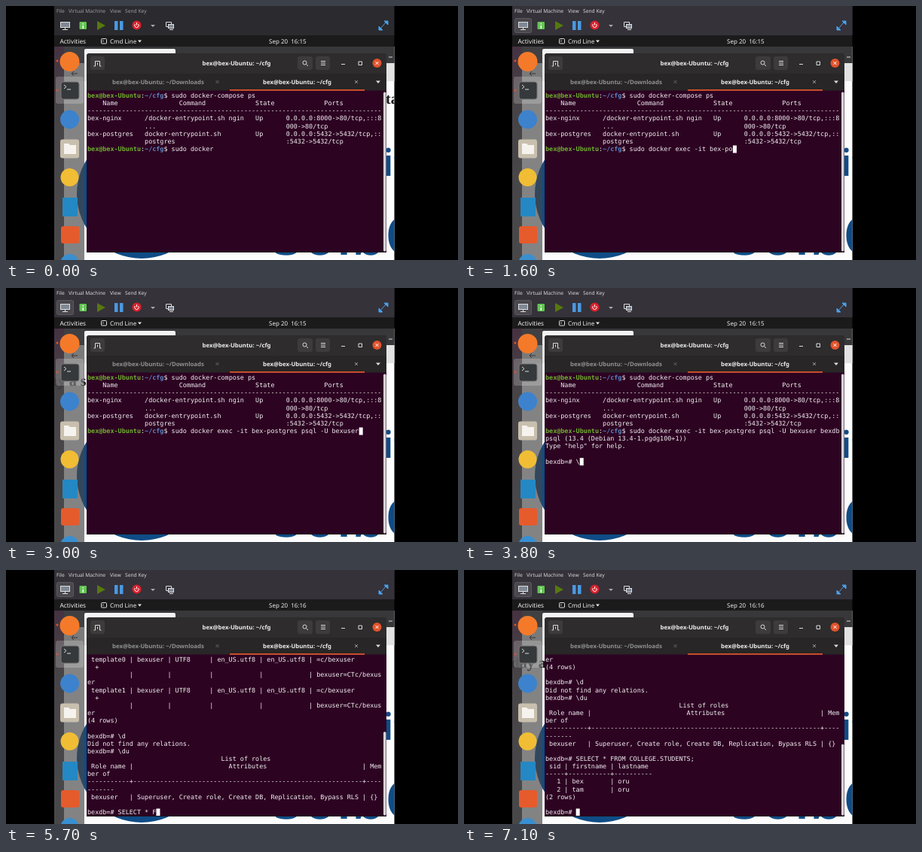
Write an HTML page that moves like this. It is 600 px wide and 338 px high and loops after 7.2 s.

```html
<!DOCTYPE html>
<html lang="en">
<head>
<meta charset="utf-8">
<style>
  html, body { margin: 0; width: 100%; height: 100%; overflow: hidden; background: #000; }
  svg { display: block; width: 100vw; height: 100vh; }
  text { white-space: pre; text-rendering: geometricPrecision; }
  .ui { font: 8px "Noto Sans", sans-serif; fill: #eee; }
  .menu { font-size: 6.7px; fill: #d8d8d8; }
  .bold { font-weight: 700; font-size: 7.8px; }
  .mid { text-anchor: middle; }
  .mono { font: 8.438px "DejaVu Sans Mono", monospace; fill: #f2f0f2; }
  .user { font-weight: 700; fill: #6fb02e; }
  .path { font-weight: 700; fill: #5b87c4; }
  .serif { font: 700 20px "Liberation Serif", serif; fill: #161616; }
  .brand { font-family: "Open Sans", sans-serif; font-weight: 600; fill: #0f4c86; text-anchor: end; }
  .line { fill: none; stroke: #ddd; }
</style>
</head>
<body>
<svg viewBox="0 0 600 338" preserveAspectRatio="none">
  <defs>
    <clipPath id="desk"><rect x="64" width="451.5" height="338"/></clipPath>
    <linearGradient id="wall" x2="0" y2="1">
      <stop stop-color="#4a0f3a"/>
      <stop offset=".3" stop-color="#4c4449"/>
      <stop offset="1" stop-color="#505052"/>
    </linearGradient>
  </defs>
  <rect width="600" height="338" fill="#000"/>
  <g clip-path="url(#desk)">
    <!-- web page -->
    <rect x="64" y="54" width="452" height="284" fill="#fcfcfc"/>
    <rect x="64" y="54" width="452" height="22" fill="#38383a"/>
    <rect x="104" y="57" width="121" height="20" rx="2" fill="#f3f3f3"/>
    <rect x="64" y="76" width="452" height="24" fill="#e2e2e3"/>
    <path d="M508 68h5" stroke="#ddd"/>
    <circle cx="180" cy="250" r="86" fill="#0f4c86"/>
    <text class="brand" x="534" y="226" font-size="50">Mirelit</text>
    <text class="brand" x="560" y="331" font-size="72">SolbO</text>
    <rect x="64" y="54" width="13" height="284" fill="url(#wall)"/>
    <text class="serif" id="ticker" y="130"><tspan id="lead">We </tspan>taste a proud Friday a school</text>

    <!-- dock -->
    <rect x="64" y="54" width="40" height="284" fill="#454547" fill-opacity=".66"/>
    <path d="M95 90h-8m3-3l-3 3 3 3" class="line" style="stroke:#333"/>
    <rect x="66" y="94" width="37" height="36" rx="3" fill="#fff" fill-opacity=".2"/>
    <circle cx="68" cy="73" r="1.5" fill="#e0522b"/>
    <circle cx="68" cy="112" r="1.5" fill="#e0522b"/>
    <circle cx="84.500" cy="74" r="13" fill="#f47a2a"/>
    <rect x="73" y="101" width="24" height="23" rx="3" fill="#36393b" stroke="#777"/>
    <path d="M77 105l3 2.500-3 2.500m4 1h5" class="line"/>
    <circle cx="84.500" cy="151" r="12.500" fill="#3d82cc"/>
    <rect x="72" y="177.500" width="25" height="25" rx="3" fill="#c9bfae"/>
    <path d="M77 183h6l2 2h8v12h-16z" fill="#f6f3ee"/>
    <circle cx="84.500" cy="228" r="12" fill="#f0bd35"/>
    <rect x="75" y="255" width="20" height="25" fill="#2488c4"/>
    <rect x="73" y="293" width="24" height="23" rx="3" fill="#e55b2c"/>
    <circle cx="84.500" cy="342" r="12" fill="#3a8fd0"/>

    <!-- viewer menu and toolbar -->
    <rect x="64" width="452" height="39" fill="#2b2a2e"/>
    <rect id="glow" x="64" width="452" height="39" fill="#35323a"/>
    <g class="ui" id="menu">
      <text class="menu" x="67" y="9">File</text>
      <text class="menu" x="83" y="9">Virtual Machine</text>
      <text class="menu" x="138" y="9">View</text>
      <text class="menu" x="158" y="9">Send Key</text>
    </g>
    <rect id="focus" x="67.500" y="16.500" width="22" height="19" rx="2" fill="#4a484d" stroke="#5c5a60"/>
    <rect x="72.500" y="21.500" width="12" height="7" fill="#7f8894" stroke="#ddd"/>
    <path d="M75 31.500h7m-3.500-3v3" class="line"/>
    <rect x="97.500" y="21" width="9.500" height="10" rx="1" fill="#62c552"/>
    <path d="M102.300 23v1.500m0 1.500v4" stroke="#fff" stroke-width="1.500"/>
    <path d="M121 20l11 6-11 6z" fill="#57780f"/>
    <path d="M144 20h4.500v12h-4.500zm7 0h4.500v12h-4.500z" fill="#4a98e0"/>
    <circle cx="173.500" cy="25.500" r="6" fill="#dd202c"/>
    <path d="M171.500 24a2.700 2.700 0 1 0 4 0m-2-2v3.500" class="line" style="stroke:#fff"/>
    <path d="M192 25h6l-3 3z" fill="#aaa"/>
    <path d="M212.500 21.500h7v6h-7z" class="line"/>
    <rect x="215.500" y="24.500" width="7" height="5" fill="#7f8894" stroke="#ddd"/>
    <path d="M217 31.500h5" class="line"/>
    <path d="M502 20h5v5zM495 27v5h5zM497 30l7-8" fill="#4aa0e8" stroke="#4aa0e8"/>

    <!-- desktop bar -->
    <rect x="64" y="39" width="452" height="15" fill="#1b1b1c"/>
    <g class="ui">
      <text x="71.500" y="49.500" font-size="8.300">Activities</text>
      <rect x="126.500" y="43.500" width="7" height="6.500" rx="1" class="line"/>
      <path d="M128 45l1.500 1.500-1.500 1.500" class="line" stroke-width=".8"/>
      <text x="138" y="49.500">Cmd Line</text>
      <path d="M175 45.500h5l-2.500 3z"/>
      <text x="349" y="49.500" id="clock"></text>
    </g>

    <!-- shell window -->
    <path d="M107 328v-261q0-4 4-4h390q4 0 4 4v261z" fill="#2d0322"/>
    <path d="M107 112.500v-45.500q0-4 4-4h390q4 0 4 4v45.500z" fill="#282627"/>
    <path d="M107 90v-23q0-4 4-4h390q4 0 4 4v23z" fill="#2e2c2d"/>
    <g fill="#3d3b3c">
      <rect x="112" y="67" width="19" height="18" rx="3"/>
      <rect x="387" y="67" width="20" height="18" rx="3"/>
      <rect x="411" y="67" width="19" height="18" rx="3"/>
    </g>
    <path d="M118.500 80v-6.500h6v6.500m-8 0h2m6 0h2m-5-4.500v3" class="line"/>
    <circle cx="396.500" cy="75.500" r="2.500" class="line"/>
    <path d="M398.500 77.500l2.500 2.500M418 73.500h6m-6 2.500h6m-6 2.500h6M445 77.500h5M468 74h4.500v4.500h-4.500z" class="line"/>
    <circle cx="492.500" cy="76" r="6" fill="#e2532c"/>
    <path d="M490.500 74l4 4m0-4l-4 4" class="line" style="stroke:#fff"/>
    <g class="ui bold mid">
      <text x="306" y="79">bex@bex-Ubuntu: ~/cfg</text>
      <text x="202" y="104" fill="#929292">bex@bex-Ubuntu: ~/Downloads</text>
      <text x="386.500" y="104">bex@bex-Ubuntu: ~/cfg</text>
    </g>
    <path d="M278.500 99l4 4m0-4l-4 4" class="line" style="stroke:#666"/>
    <path d="M463 99l4 4m0-4l-4 4" class="line" style="stroke:#999"/>
    <path d="M491 99.500h6l-3 3.500z" fill="#ddd"/>
    <rect x="297" y="111" width="179" height="1.800" fill="#d9532c"/>
    <g id="rows"></g>
    <rect id="cursor" width="5" height="10" fill="#fff"/>
    <rect id="thumb" x="501" width="3.500" rx="1.500" fill="#d8d2d6"/>
    <path d="M107 327.500h398" stroke="#1d1119"/>
  </g>
</svg>
<script>
const LOOP = 7200, STEP = 100;
const COLS = 77, ROWS = 21, CELL = 5.08, LEAD = 10.15, LEFT = 108, TOP = 122;
const PROMPT = 'bex@bex-Ubuntu:~/cfg$ ', DB = '\nbexdb=# ';
const $ = id => document.getElementById(id);

// Place [column, text] pairs on one line.
const at = (...cells) => cells.reduce((s, [col, txt]) => s.padEnd(col) + txt, '');
const center = (txt, w) => (' '.repeat((w - txt.length) >> 1) + txt).padEnd(w);
const join = (cells, widths) => cells.map((c, i) => ' ' + c.padEnd(widths[i]) + ' ').join('|');
const rule = widths => widths.map(w => '-'.repeat(w + 2)).join('+');
const table = (heads, widths, rows) => [
  join(heads.map((h, i) => center(h, widths[i])), widths),
  rule(widths), ...rows.map(r => join(r, widths))
];

const intro = [
  PROMPT + 'sudo docker-compose ps',
  at([4, 'Name'], [24, 'Command'], [44, 'State'], [62, 'Ports']),
  '-'.repeat(COLS),
  at([0, 'bex-nginx'], [15, '/docker-entrypoint.sh ngin'], [44, 'Up'], [52, '0.0.0.0:8000->80/tcp,:::8']),
  at([15, '...'], [52, '000->80/tcp']),
  at([0, 'bex-postgres'], [15, 'docker-entrypoint.sh'], [44, 'Up'], [52, '0.0.0.0:5432->5432/tcp,::']),
  at([15, 'postgres'], [52, ':5432->5432/tcp']),
  PROMPT + 'sudo docker'
].join('\n');

const dbRow = (name, access = '') => [name, 'bexuser', 'UTF8', 'en_US.utf8', 'en_US.utf8', access];
const template = name => [
  dbRow(name, '=c/bexuser'.padEnd(19) + '+'),
  ['', '', '', '', '', 'bexuser=CTc/bexuser']
];
const databases = [center('List of databases', 80), ...table(
  ['Name', 'Owner', 'Encoding', 'Collate', 'Ctype', 'Access privileges'],
  [9, 7, 8, 10, 10, 19],
  [dbRow('bexdb'), dbRow('postgres'), ...template('template0'), ...template('template1')]
), '(4 rows)'];

const roles = [center('List of roles', 84), ...table(
  ['Role name', 'Attributes', 'Member of'], [9, 58, 9],
  [['bexuser', 'Superuser, Create role, Create DB, Replication, Bypass RLS', '{}']]
)];

const students = [...table(['sid', 'firstname', 'lastname'], [3, 9, 8],
  [['  1', 'bex', 'oru'], ['  2', 'tam', 'oru']]), '(2 rows)'];

const print = lines => '\n' + lines.map(s => s.trimEnd()).join('\n') + '\n' + DB;

// start, typing time, text
const script = [
  [800, 800, ' exec -it bex-po'],
  [1600, 1400, 'stgres psql -U bexuser'],
  [3000, 400, ' bexdb'],
  [3500, 0, print(['psql (13.4 (Debian 13.4-1.pgdg100+1))', 'Type "help" for help.'])],
  [3700, 200, '\\l'],
  [4100, 0, print(databases)],
  [4500, 200, '\\d'],
  [4800, 0, '\nDid not find any relations.' + DB],
  [4900, 300, '\\du'],
  [5300, 0, print(roles)],
  [5300, 400, 'SELECT * F'],
  [5700, 1000, 'ROM COLLEGE.STUDENTS;'],
  [6800, 0, print(students)]
];

const typed = (t, [start, dur, txt]) => t >= start + dur ? txt
  : txt.slice(0, Math.max(0, Math.floor(txt.length * (t - start) / dur)));
const wrap = line => line.match(new RegExp(`.{1,${COLS}}`, 'g')) || [''];
const paint = line => line.replace(/</g, '&lt;').replace(/>/g, '&gt;').replace(
  /^(bex@bex-Ubuntu):(~\/cfg)/, '<tspan class="user">$1</tspan>:<tspan class="path">$2</tspan>');

const rows = Array.from({ length: ROWS }, (_, i) => {
  const row = document.createElementNS('http://www.w3.org/2000/svg', 'text');
  row.setAttribute('class', 'mono');
  row.setAttribute('x', LEFT);
  row.setAttribute('y', TOP + i * LEAD);
  return $('rows').appendChild(row);
});
const leadWidth = $('lead').getComputedTextLength();

function drawShell(t) {
  const all = (intro + script.map(s => typed(t, s)).join('')).split('\n').flatMap(wrap);
  const view = all.slice(-ROWS), last = view.length - 1;
  rows.forEach((row, i) => row.innerHTML = paint(view[i] || ''));
  $('cursor').setAttribute('x', LEFT + view[last].length * CELL);
  $('cursor').setAttribute('y', TOP - 7.5 + last * LEAD);
  $('cursor').style.opacity = t > 800 ? 1 : 0;
  const size = 212 * Math.min(1, ROWS / all.length);
  $('thumb').setAttribute('y', 326.5 - size);
  $('thumb').setAttribute('height', size);
}

function draw(t) {
  const phase = (t + 300) % 4175 - 300;
  const focused = t >= 400;
  $('ticker').setAttribute('x', 504 - leadWidth - phase * .2);
  $('clock').textContent = t < 4800 ? 'Sep 20  16:15' : 'Sep 20  16:16';
  $('menu').style.opacity = focused ? 1 : .65;
  $('focus').style.opacity = $('glow').style.opacity = focused ? 1 : 0;
  drawShell(t);
}

let shown = -1;
const origin = performance.now();
function tick() {
  const t = Math.floor((performance.now() - origin) % LOOP / STEP) * STEP;
  if (t !== shown) draw(shown = t);
  requestAnimationFrame(tick);
}
tick();
</script>
</body>
</html>
```
